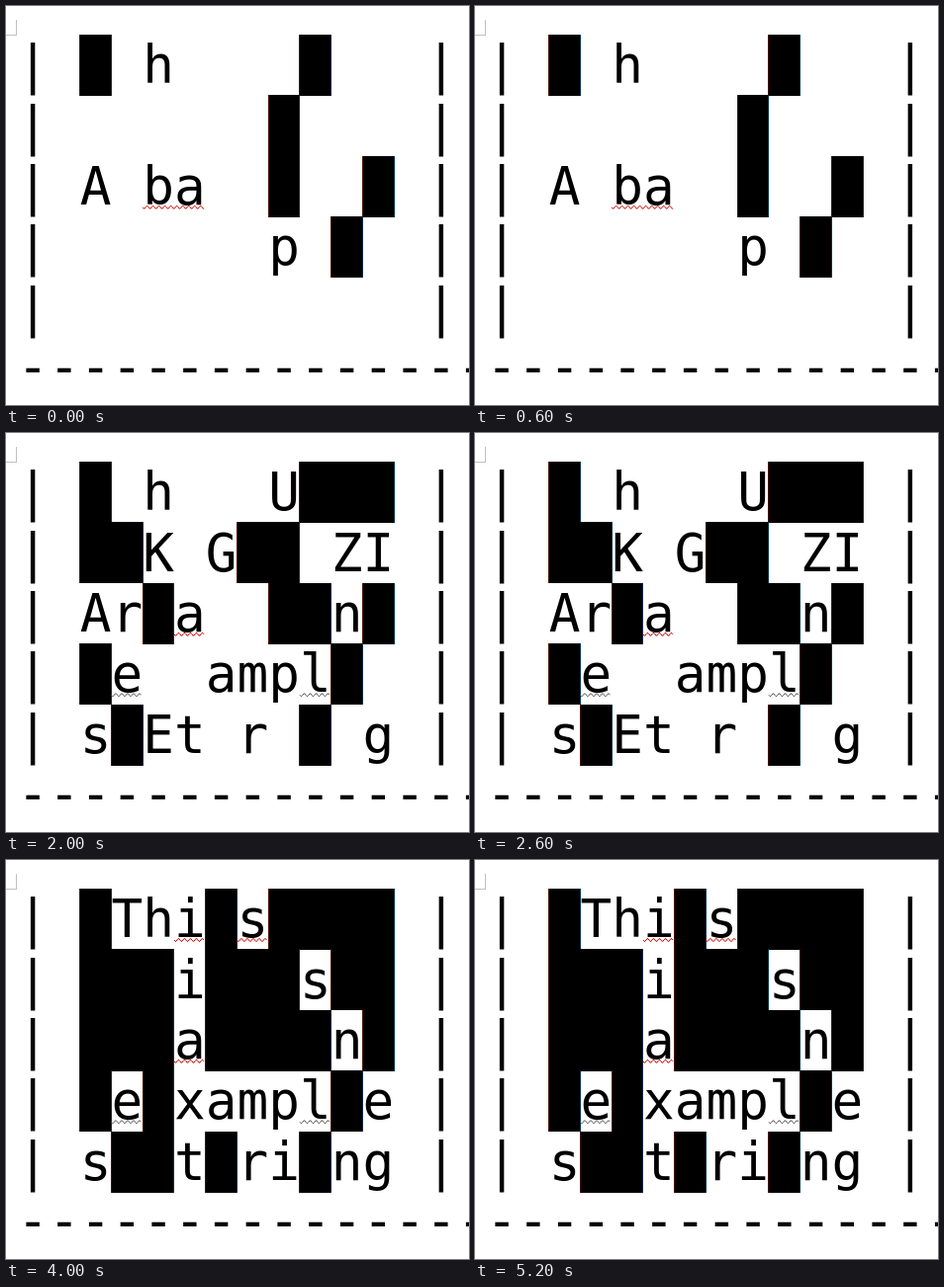
Animation of 468x404 px, one loop 6000 ms. Source, as an HTML page with a canvas:

```html
<!DOCTYPE html>
<html lang="en">
<head>
<meta charset="utf-8">
<style>
  html, body { margin: 0; width: 100%; height: 100%; overflow: hidden; background: #fff; }
  canvas { display: block; }
</style>
</head>
<body>
<canvas width="468" height="404"></canvas>
<script>
const ctx = document.querySelector('canvas').getContext('2d', { alpha: false });
const LEFT = 74.7, TOP = 29, CELL = 31.75, LINE = 61.4, BASE = 49.2;
const RED = '#d40000', GRAY = '#555';

// rows: ten cells each, # is a solid block; waves: [row, column, cells, colour]
const A = [2, 3, 1, RED], E = [3, 1, 1, GRAY], L = [3, 7, 1, GRAY];
const steps = [
  { rows: ['# h    #  ', '      #   ', 'A ba  #  #', '      p # ', ''],
    waves: [[2, 2, 2, RED]] },
  { rows: ['# h   U# #', '##   L#  I', 'Ar#a  #  #', '#   amp # ', 's#Et r B  '],
    waves: [[1, 5, 1, RED], A] },
  { rows: ['# h   U###', '##K G## ZI', 'Ar#a  ##n#', '#e  ampl# ', 's#Et r # g'],
    waves: [A, E, L] },
  { rows: ['# h # ####', '###i###s#I', '###a N##n#', '#eX ampl#e', 's##t#r #ng'],
    waves: [A, E, L] },
  { rows: ['#Thi#s####', '###i###s##', '###a####n#', '#e#xampl#e', 's##t#ri#ng'],
    waves: [[0, 3, 1, RED], [0, 5, 1, RED], A, E, L] }
];

const cellX = col => LEFT + col * CELL;
const rowY = row => TOP + row * LINE;

function rect(x, y, w, h, color) {
  ctx.fillStyle = color;
  ctx.fillRect(x, y, w, h);
}

function glyph(ch, col, y) {
  ctx.fillStyle = '#000';
  ctx.fillText(ch, cellX(col), y);
}

// A run of blocks has faint coloured fringes at its two ends
function blocks(start, count, row) {
  const x = Math.round(cellX(start) - 0.6);
  const end = Math.round(cellX(start + count) + 0.3);
  const y = Math.round(rowY(row));
  rect(x, y, end - x, 62, '#000');
  rect(x, y, 1, 62, '#4a1400');
  rect(end - 1, y, 1, 62, '#00304a');
}

function wave([row, col, count, color]) {
  const x = cellX(col), y = rowY(row) + BASE + 2.8;
  ctx.beginPath();
  for (let d = 0; d <= count * CELL - 1; d++) {
    ctx.lineTo(x + d, y + 1.5 * Math.sin(d * Math.PI / 3));
  }
  ctx.strokeStyle = color;
  ctx.lineWidth = 1;
  ctx.stroke();
}

function draw({ rows, waves }) {
  rect(0, 0, 468, 404, '#fff');
  rect(10, 14, 1, 16, '#c0c0c0');
  rect(0, 29, 11, 1, '#c0c0c0');
  ctx.font = '52.7px "DejaVu Sans Mono", monospace';

  rows.forEach((text, row) => {
    for (const run of text.matchAll(/#+/g)) blocks(run.index, run[0].length, row);
  });
  rows.forEach((text, row) => {
    const y = rowY(row) + BASE;
    glyph('|', -2, y);
    glyph('|', 11, y);
    [...text].forEach((ch, col) => {
      if (ch !== '#' && ch !== ' ') glyph(ch, col, y);
    });
  });
  for (let col = -2; col < 13; col++) glyph('-', col, 384);
  waves.forEach(wave);
}

const origin = performance.now();
function tick() {
  const time = (performance.now() - origin) % 6000;
  draw(steps[Math.min(4, Math.floor(time / 1000))]);
  requestAnimationFrame(tick);
}
tick();
</script>
</body>
</html>
```
